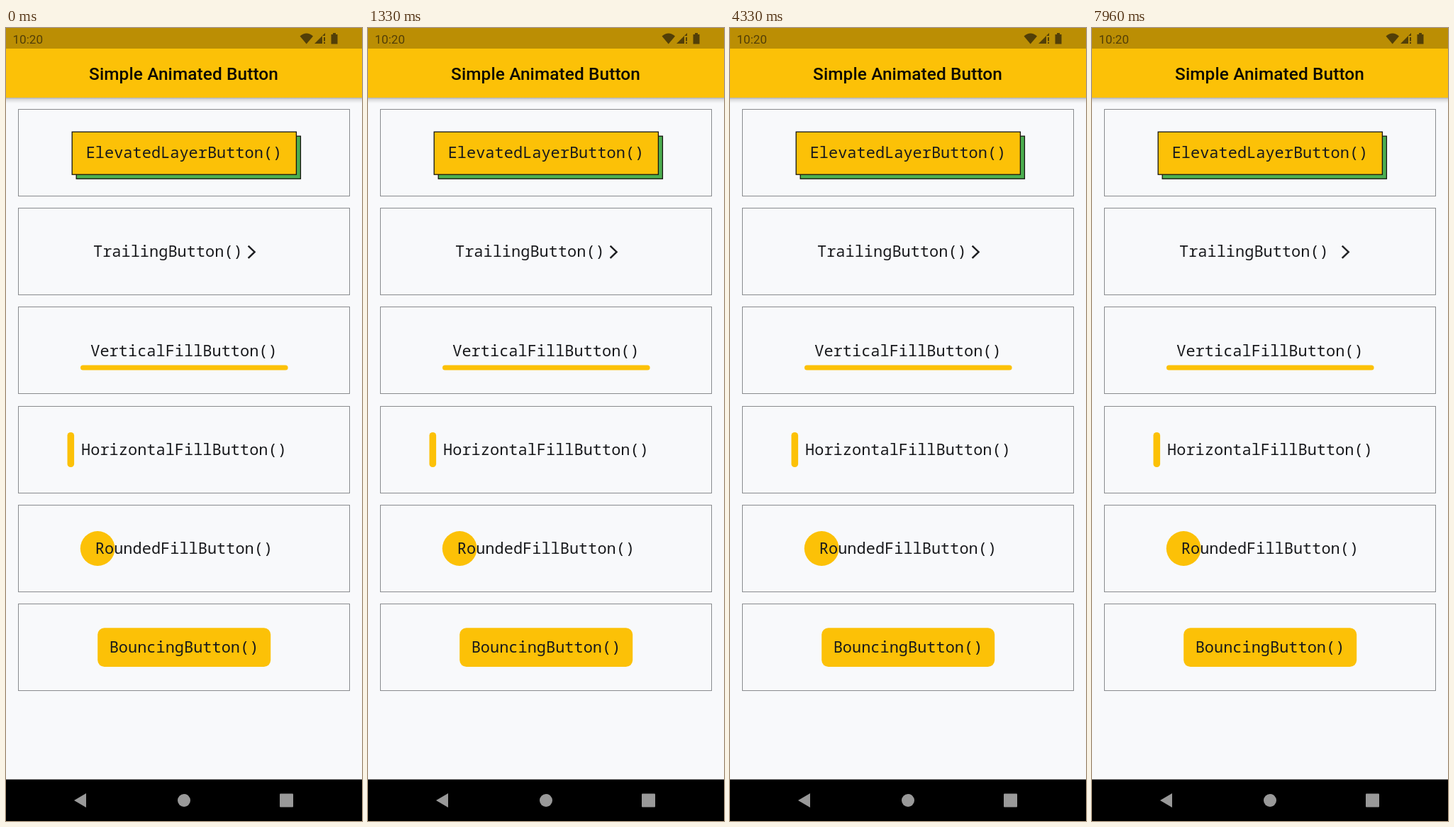
An HTML page for the animation above (8 s loop, 502 by 1116 pixels).

```html
<!DOCTYPE html>
<html lang="en">
<head>
<meta charset="utf-8">
<title>Simple Animated Button</title>
<style>
  html, body { margin: 0; width: 100%; height: 100%; overflow: hidden; background: #f8f9fb; }
  svg { display: block; width: 100%; height: 100%; }
  text { text-anchor: middle; }
  .label { font: 500 21.96px "Noto Sans Mono", monospace; fill: #18191c; }
  .title { font: 500 24.4px Roboto, sans-serif; letter-spacing: .1px; fill: #0c0a03; }
  .clock { font: 400 17.1px Roboto, sans-serif; text-anchor: start; }
  .status { fill: #523f08; }
  .nav { fill: #999; }
  .amber { fill: #fcc107; }
  .card { fill: none; stroke: #898b8e; shape-rendering: crispEdges; }
  .layer { stroke: #15140f; stroke-width: 1.3; }
  .chevron { fill: none; stroke: #1b1c1f; stroke-width: 2.4; }
  .press, .trail { animation: press 8s cubic-bezier(.25, .1, .25, 1) infinite; }
  .trail { animation-name: trail; }

  @keyframes press {
    0%, 24.55%, 30.75%, 40.375%, 46.5%, 100% { transform: none; }
    27.05%, 28.25%, 42.875%, 44% { transform: translate(6.1px, 6.1px); }
  }
  @keyframes trail {
    0%, 70.71%, 78%, 84.3%, 91.5%, 97.95% { transform: none; }
    73.21%, 75.5%, 86.8%, 89% { transform: translateX(12.2px); }
    100% { transform: translateX(11.5px); }
  }
</style>
</head>
<body>
<svg viewBox="0 0 502 1116" preserveAspectRatio="none">
  <defs>
    <linearGradient id="shadow" x2="0" y2="1">
      <stop offset="0" stop-color="#000" stop-opacity=".36"/>
      <stop offset=".4" stop-color="#000" stop-opacity=".12"/>
      <stop offset="1" stop-color="#000" stop-opacity="0"/>
    </linearGradient>
  </defs>
  <rect width="502" height="1116" fill="#f8f9fb"/>

  <!-- App bar -->
  <rect y="97" width="502" height="9" fill="url(#shadow)"/>
  <rect class="amber" y="29" width="502" height="69"/>
  <rect width="502" height="29" fill="#bb8e04"/>
  <text class="title" x="250.5" y="72.7">Simple Animated Button</text>
  <g class="status">
    <text class="clock" x="9.5" y="21.6">10:20</text>
    <path d="M414.5 11.5Q423.7 3.5 433 11.5L423.7 22.5Z"/>
    <path d="M435 22L450 7V11H446V22Z"/>
    <path d="M448 13h2v5.5h-2zM448 20h2v2h-2z"/>
    <path d="M458.5 9h2.5v-2h4v2h2.5v13.5h-9z"/>
  </g>

  <g id="cards"></g>

  <!-- Elevated layers -->
  <rect class="layer" x="99.2" y="152.2" width="316.2" height="60" fill="#4caf50"/>
  <g class="press">
    <rect class="layer amber" x="93.2" y="146.2" width="316.2" height="60"/>
    <text class="label" x="251" y="183.3">ElevatedLayerButton()</text>
  </g>

  <!-- Trailing arrow -->
  <text class="label" x="228.4" y="322.4">TrailingButton()</text>
  <path class="chevron trail" d="M341.6 306.6L350.6 315.2L341.6 323.8"/>

  <!-- Fill buttons -->
  <rect class="amber" x="105" y="474.4" width="292.6" height="7.2" rx="3.6"/>
  <text class="label" x="251" y="461.6">VerticalFillButton()</text>
  <rect class="amber" x="86.5" y="569" width="9.6" height="49" rx="4.6"/>
  <text class="label" x="251" y="600.8">HorizontalFillButton()</text>
  <circle class="amber" cx="129.2" cy="732.5" r="24.4"/>
  <text class="label" x="251" y="740">RoundedFillButton()</text>

  <!-- Bouncing button -->
  <rect class="amber" x="129.2" y="844.3" width="244" height="54.7" rx="9.5"/>
  <text class="label" x="251" y="879.2">BouncingButton()</text>

  <!-- Navigation bar -->
  <rect y="1057.5" width="502" height="58.5"/>
  <g class="nav">
    <path d="M96 1087L113 1077V1097Z"/>
    <circle cx="251" cy="1087" r="9"/>
    <rect x="386" y="1077.5" width="19" height="19" rx="1"/>
  </g>
</svg>
<script>
  const cards = document.getElementById('cards');
  for (let row = 0; row < 6; row++) {
    const y = Math.round(114 + row * 139.2) + .5;
    cards.innerHTML += `<rect class="card" x="17.5" y="${y}" width="467" height="122"/>`;
  }
</script>
</body>
</html>
```
